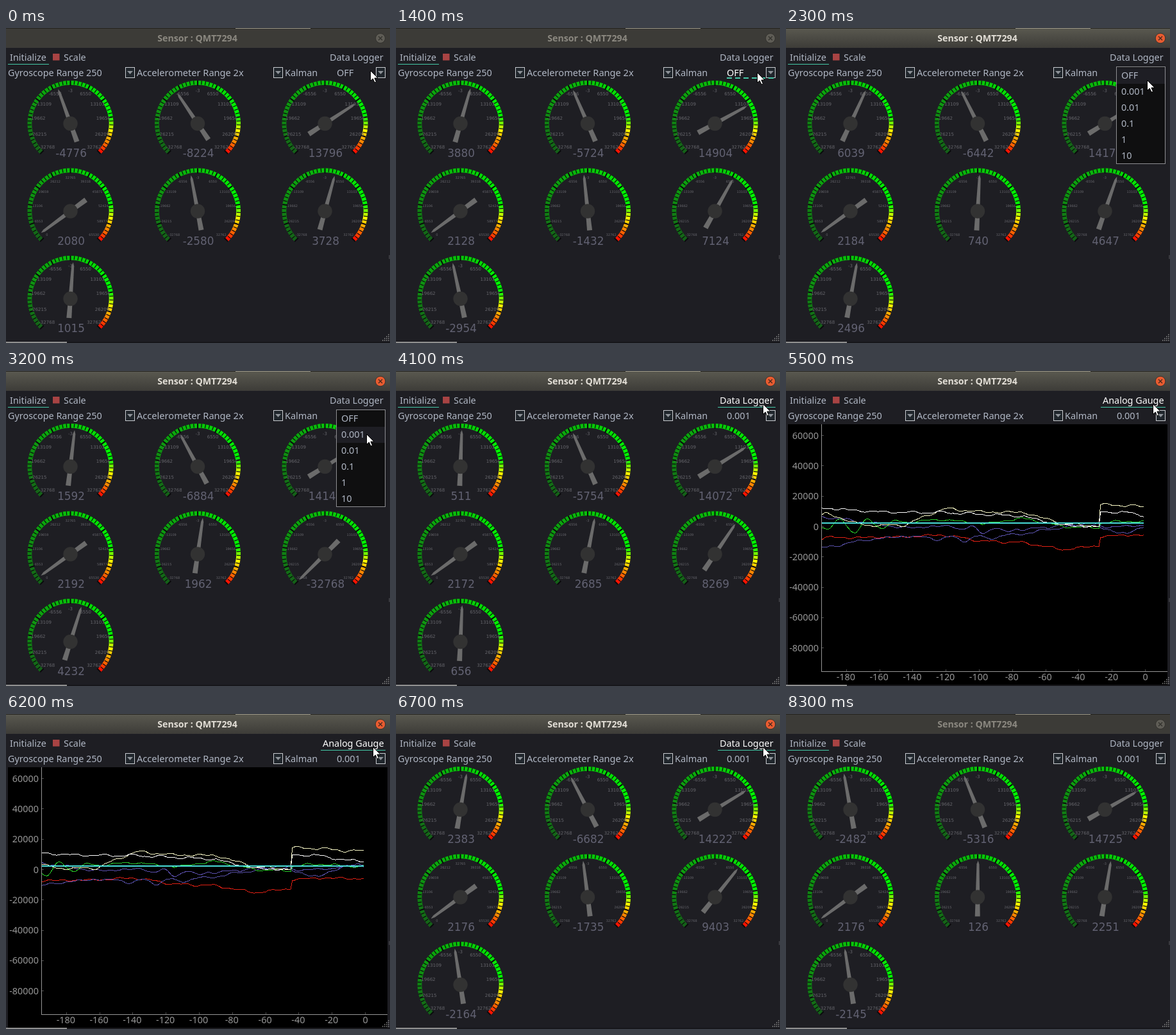
Recreate the animation shown at these times as an HTML page. Size 599 by 491 pixels, loop 8.4 s.

```html
<!DOCTYPE html>
<html lang="en">
<head>
<meta charset="utf-8">
<title>Sensor gauges</title>
<style>
  html, body { margin: 0; width: 100%; height: 100%; overflow: hidden; background: #1e1e23; }
  svg { display: block; width: 599px; height: 491px; }
  text { font: 14.4px "Noto Sans", sans-serif; fill: #b0b7c4; white-space: pre; }
  .title { font-weight: bold; font-size: 14.2px; text-anchor: middle; }
  .hot { fill: #fff; }
  .line { stroke: #45c9a8; shape-rendering: crispEdges; }
  .mark, .value { font-family: "DejaVu Sans", sans-serif; text-anchor: middle; }
  .mark { fill: #66666c; }
  .value { font-size: 16.8px; fill: #626272; }
  .axis text { fill: #969696; }
  .axis path { stroke: #969696; fill: none; shape-rendering: crispEdges; }
  .axis .tick { opacity: .5; }
  #curves polyline { fill: none; shape-rendering: crispEdges; }
</style>
</head>
<body>
<svg viewBox="0 0 599 491" xmlns="http://www.w3.org/2000/svg">
  <defs>
    <linearGradient id="bar" x2="0" y2="1">
      <stop stop-color="#5a5950"/><stop offset="1" stop-color="#3d3c38"/>
    </linearGradient>
    <clipPath id="plotArea"><rect x="56" y="83" width="502" height="385"/></clipPath>
    <g id="ring"></g>
    <g id="arrow">
      <rect x=".5" y=".5" width="14" height="16" fill="#20262c" stroke="#c9ccd0"/>
      <path d="M3 6h9l-4.5 5z" fill="#8d9298"/>
    </g>
  </defs>

  <rect width="599" height="491" fill="#1e1e23"/>

  <g data-on="0-1700 8200-8400">
    <rect width="599" height="31" fill="#3c3b37"/>
    <text class="title" x="298.5" y="21" style="fill:#8b8880">Sensor : QMT7294</text>
    <circle cx="584" cy="16" r="7.5" fill="#5f5d56" stroke="#33322e"/>
    <path d="M581 13l6 6m0-6l-6 6" stroke="#35342f" stroke-width="1.5"/>
  </g>
  <g data-on="1700-8200">
    <rect width="599" height="31" fill="url(#bar)"/>
    <text class="title" x="298.5" y="21" style="fill:#e2ded6">Sensor : QMT7294</text>
    <circle cx="584" cy="16" r="7.8" fill="#e95c30" stroke="#3a332e"/>
    <path d="M581 13l6 6m0-6l-6 6" stroke="#45281e" stroke-width="1.4"/>
  </g>
  <path d="M0 .5H599" stroke="#24231f"/>
  <path d="M358 .5H475" stroke="#989485"/>
  <path d="M0 490H599" stroke="#17171b" stroke-width="2"/>
  <path d="M0 490H95" stroke="#8f8f8f" stroke-width="2"/>
  <path d="M598 354v6" stroke="#55555a"/>

  <text x="6" y="51">Initialize</text>
  <path class="line" d="M3 56.5H67" data-on="0-4400 8200-8400"/>
  <rect x="73" y="40" width="10.5" height="10.5" fill="#a84343"/>
  <text x="90" y="51">Scale</text>
  <text x="505" y="51" data-on="0-4100 7600-8400">Data Logger</text>
  <text class="hot" x="505" y="51" data-on="4100-4400 6600-7600">Data Logger</text>
  <path class="line" d="M502 56.5H592" data-on="4100-4400 6600-8200"/>
  <g data-on="4400-6600">
    <text class="hot" x="494" y="51">Analog Gauge</text>
    <path class="line" d="M491 56.5H592"/>
  </g>

  <text x="3" y="75">Gyroscope Range 250</text>
  <text x="204" y="75" style="font-size:14.6px">Accelerometer Range 2x</text>
  <text x="435" y="75">Kalman</text>
  <use href="#arrow" x="186" y="61"/>
  <use href="#arrow" x="417" y="61"/>
  <use href="#arrow" x="577" y="61"/>
  <text x="516" y="75" data-on="0-100">OFF</text>
  <text class="hot" x="516" y="75" data-on="100-3500">OFF</text>
  <text class="hot" x="516" y="75" data-on="3500-3700">0.001</text>
  <text x="516" y="75" data-on="3700-8400">0.001</text>
  <path class="line" d="M516 78H592" stroke-width="2" stroke-dasharray="8 5" data-on="100-3700"/>

  <g id="gauges" data-on="0-4400 6600-8400"></g>

  <g data-on="4400-6600">
    <rect x="3" y="83" width="592" height="406" fill="#000"/>
    <g class="axis" id="axis"><path d="M55.5 83V468.5H595"/></g>
    <g clip-path="url(#plotArea)"><g id="curves"></g></g>
  </g>

  <g id="popup" data-on="2000-3500">
    <rect x="515.5" y="60.5" width="76" height="151" fill="#0f0f10" stroke="#8e8e92"/>
    <rect id="hover" x="516" width="75" height="25" fill="#1e1e24"/>
  </g>

  <path id="grip" stroke="#8a8a8a" stroke-width="1.5"/>
  <path id="cursor" d="M0 0V16L3.8 12.5L6.5 18.5L9 17.4L6.4 11.6H11.5Z" fill="#fff" stroke="#000"/>
</svg>
<script>
const LOOP = 8400;
const $ = id => document.getElementById(id);

function add(parent, tag, attrs, text) {
  const node = document.createElementNS("http://www.w3.org/2000/svg", tag);
  for (const name in attrs) node.setAttribute(name, attrs[name]);
  if (text !== undefined) node.textContent = text;
  return parent.appendChild(node);
}

const mix = (a, b, u) => a + (b - a) * u;

// Point at an angle in degrees, clockwise from the top
function polar(deg, r) {
  const a = deg * Math.PI / 180;
  return [r * Math.sin(a), -r * Math.cos(a)];
}

// Value at position p in an evenly spaced list
function sample(list, p) {
  p = Math.max(0, Math.min(list.length - 1, p));
  const i = Math.min(Math.floor(p), list.length - 2);
  return mix(list[i], list[i + 1], p - i);
}

// Index of the span of sorted times that holds t, and how far into it t is
function span(times, t) {
  let i = times.length - 2;
  while (i > 0 && times[i] > t) i--;
  return [i, Math.min(1, (t - times[i]) / (times[i + 1] - times[i]))];
}

// ---- gauges ----
function ringColor(p) {
  if (p < .1) return `rgb(255,${Math.round(p * 2550)},0)`;
  if (p < .15) return `rgb(${Math.round((.15 - p) * 5100)},255,0)`;
  return `rgba(0,255,0,${(1 - p) / .85})`;
}

for (let i = 0; i < 50; i++) {
  const from = -135 + i * 5.4;
  add($("ring"), "path", {
    d: `M${polar(from, 63.6)}A63.6 63.6 0 0 1 ${polar(from + 5.4, 63.6)}`,
    fill: "none", "stroke-width": 6.8, stroke: ringColor((132.3 - from) / 360)
  });
}
for (let i = 0; i <= 50; i++) {
  const deg = -135 + i * 5.4, big = i % 5 === 0;
  add($("ring"), "path", {
    d: `M${polar(deg, big ? 59 : 61)}L${polar(deg, 67)}`,
    stroke: "#0a0a0c", "stroke-width": big ? 2 : 1.2
  });
}

// Readings at KEY_TIMES, and how far they sway in between
const KEY_TIMES = [0, 1400, 3200, 6700, 8300];
const SENSORS = [
  { keys: [-4776, 3880, 1592, 2383, -2482], sway: 3500 },
  { keys: [-8224, -5724, -6884, -6682, -5316], sway: 1500 },
  { keys: [13796, 14904, 14144, 14222, 14725], sway: 400 },
  { keys: [2080, 2128, 2192, 2176, 2176], sway: 30, min: 0, size: 5 },
  { keys: [-2580, -1432, 1962, -1735, 126], sway: 2500, size: 5 },
  { keys: [3728, 7124, 8000, 9403, 2251], sway: 3000, size: 5, dropout: 3200 },
  { keys: [1015, -2954, 4232, -2164, -2145], sway: 3000 }
];

SENSORS.forEach((s, n) => {
  s.min = s.min ?? -32768;
  const size = s.size || 7;
  const x = 100.5 + (n % 3) * 198.5, y = 149 + Math.floor(n / 3) * 136.5;
  const g = add($("gauges"), "g", { transform: `translate(${x} ${y})` });
  add(g, "use", { href: "#ring" });
  for (let i = 0; i <= 10; i++) {
    const [lx, ly] = polar(-135 + i * 27, 52);
    add(g, "text", { class: "mark", x: lx, y: ly + size * .36, style: `font-size:${size}px` }, s.min + i * 6553);
  }
  s.label = add(g, "text", { class: "value", x: 1, y: 52 });
  s.needle = add(g, "path", { d: "M4 30H-4L-2-51L0-57L2-51Z", fill: "#6b6b6b" });
  add(g, "circle", { r: 11.2, fill: "#323232" });
});

function reading(s, n, t) {
  if (t === s.dropout) return -32768;
  const [i, u] = span(KEY_TIMES, t);
  const sway = s.sway * Math.sin(Math.PI * u) * Math.sin(t * .006 + n * 2);
  return Math.round(mix(s.keys[i], s.keys[i + 1], u) + sway);
}

// ---- plot ----
const UNIT = 2.59, RESUME = 547;
for (let v = 60000; v >= -80000; v -= 20000) {
  const y = 242.5 - v / 20000 * 47.3;
  add($("axis"), "text", { x: 51, y: y + 5, "text-anchor": "end" }, v);
  add($("axis"), "path", { class: "tick", d: `M56 ${y}h3` });
}
for (let v = -180; v <= 0; v += 20) {
  const x = 560.5 + v * UNIT;
  add($("axis"), "text", { x: x - (v ? 1 : 0), y: 482, "text-anchor": "middle" }, v);
  add($("axis"), "path", { class: "tick", d: `M${x} 468v-3` });
}

// Heights at even steps before and after logging resumes; wave = [height, centre, period]
const CURVES = [
  { color: "#e02014", past: [292, 260, 260, 259, 256, 266, 268, 279, 272], next: [259, 256, 257] },
  { color: "#5850a8", past: [275, 276, 264, 258, 262, 261, 254, 244, 239], next: [246, 254, 236], wave: [4, 335, 43] },
  { color: "#5b4fae", past: [237, 228, 236, 245, 242, 249, 248, 241, 238], next: [243, 243, 238], wave: [4, 365, 36] },
  { color: "#28c828", past: [243, 241, 242, 236, 232, 239, 230, 243, 245], next: [238, 234, 238], wave: [10, 163, 44] },
  { color: "#f4f4c0", past: [260, 222, 241, 241, 215, 220, 221, 238, 243], next: [209, 210, 214] },
  { color: "#ffffff", past: [208, 214, 219, 221, 221, 224, 227, 241, 244], next: [220, 221, 229] },
  { color: "#48dcd8", past: [237, 237], next: [237, 237], rough: 0, width: 2 }
];

function height({ past, next, wave, rough = 1 }, n, x) {
  let y = x < RESUME ? sample(past, (x - 55) / 62) : sample(next, (x - RESUME) / 43);
  if (wave) {
    const [h, centre, period] = wave, d = x - centre;
    y += h * Math.exp(-((d / 55) ** 2)) * Math.cos(2 * Math.PI * d / period);
  }
  return y + rough * (1.2 * Math.sin(x * .13 + n * 2) + .8 * Math.sin(x * .29 + n * 5) + .4 * Math.sin(x * 5 + n));
}

CURVES.forEach((curve, n) => {
  const { color, width = 1 } = curve;
  const points = [];
  for (let x = 40; x < 700; x += UNIT)
    points.push(`${x.toFixed(1)},${Math.round(height(curve, n, x)) - width % 2 / 2}`);
  add($("curves"), "polyline", { points: points.join(" "), stroke: color, "stroke-width": width });
});

// ---- menu, resize grip ----
["OFF", "0.001", "0.01", "0.1", "1", "10"].forEach((name, i) =>
  add($("popup"), "text", { x: 523, y: 79 + i * 25 }, name));

let dots = "";
for (let r = 0; r < 4; r++)
  for (let c = 0; c <= r; c++) dots += `M${596 - c * 3} ${478 + r * 3}h1.5`;
$("grip").setAttribute("d", dots);

// ---- playback ----
const CURSOR = [
  { t: 0, x: 568, y: 66 },
  { t: 1400, x: 563, y: 69 },
  { t: 1900, x: 563, y: 69 },
  { t: 2900, x: 562, y: 98 },
  { t: 3500, x: 562, y: 98 },
  { t: 4100, x: 572, y: 51 },
  { t: 7400, x: 572, y: 51 },
  { t: 8100, x: 548, y: -30 }
];
const CURSOR_TIMES = CURSOR.map(p => p.t);

const timed = [...document.querySelectorAll("[data-on]")].map(node => ({
  node, spans: node.dataset.on.split(" ").map(s => s.split("-").map(Number))
}));

function render(t) {
  for (const { node, spans } of timed)
    node.style.display = spans.some(([a, b]) => t >= a && t < b) ? "" : "none";

  SENSORS.forEach((s, n) => {
    const value = reading(s, n, t);
    s.label.textContent = value;
    s.needle.setAttribute("transform", `rotate(${-135 + (value - s.min) / 65536 * 270})`);
  });

  const shift = Math.round((t - 4600) / 900 * 22) * UNIT;
  $("curves").setAttribute("transform", `translate(${-shift} 0)`);

  const [i, u] = span(CURSOR_TIMES, t);
  const x = Math.round(mix(CURSOR[i].x, CURSOR[i + 1].x, u));
  const y = Math.round(mix(CURSOR[i].y, CURSOR[i + 1].y, u));
  const row = Math.max(0, Math.min(5, Math.floor((y - 62) / 25)));
  $("hover").setAttribute("y", 62 + row * 25);
  $("cursor").setAttribute("transform", `translate(${x + .5} ${y + .5})`);
}

// The picture advances every 100 ms, with two longer holds
function stepTime(ms) {
  const t = Math.floor(ms % LOOP / 100) * 100;
  if (t > 3200 && t < 3500) return 3200;
  return t === 3600 ? 3500 : t;
}

const start = performance.now();
let shown = -1;
function tick() {
  const t = stepTime(performance.now() - start);
  if (t !== shown) render(shown = t);
  requestAnimationFrame(tick);
}
tick();
</script>
</body>
</html>
```
